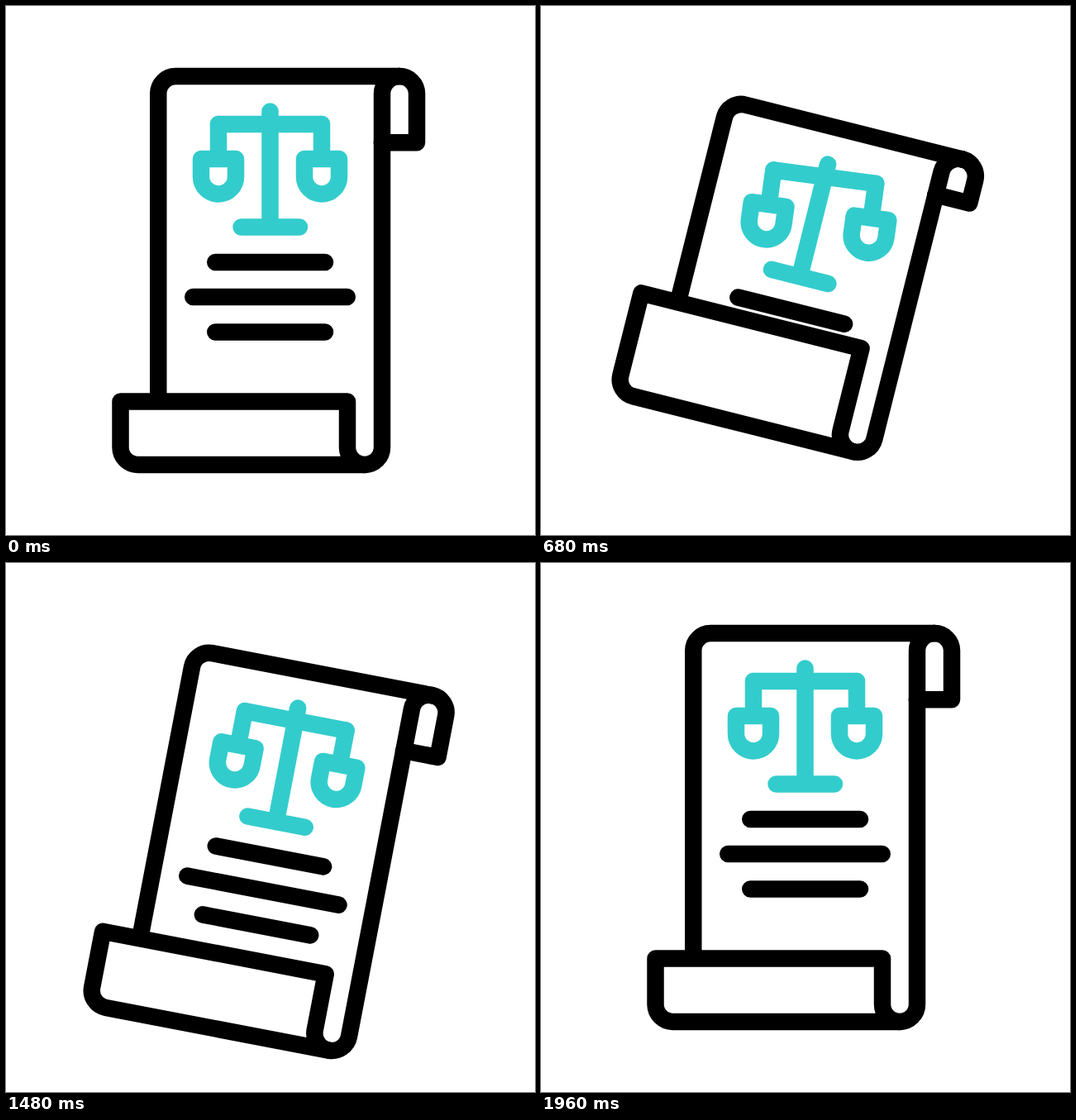
Write an HTML page that moves like this. It is 640x640 px and loops after 2000 ms.

```html
<!DOCTYPE html>
<html lang="en">
<head>
<meta charset="utf-8">
<title>Legal scroll</title>
<style>
  html, body { margin: 0; width: 100%; height: 100%; overflow: hidden; background: #fff; }
  svg { display: block; width: 100%; height: 100%; }
  path { fill: none; stroke: #000; stroke-width: 20.5; stroke-linecap: round; stroke-linejoin: round; }
  .teal path { stroke: #33cccc; }
  #box { fill: #fff; }
</style>
</head>
<body>
<svg viewBox="0 0 640 640">
  <g id="scroll">
    <path id="sheet"/>
    <path id="curl"/>
    <g id="content">
      <path d="M253.25 310H386M226.25 352H412.75M253.25 394.5H386"/>
      <g class="teal">
        <path d="M319.5 127.5V267.5M284.5 267.5H355"/>
        <path id="beam" d="M257 143H382"/>
        <path id="leftPan"/>
        <path id="rightPan"/>
      </g>
    </g>
    <path id="box"/>
    <path id="spine"/>
  </g>
</svg>
<script>
const LOOP = 2000, STEP = 40;
const PIVOT = '470 320';
const HUB = { x: 319.5, y: 143 }, ARM = 62.5;
const LEFT = 184.25, RIGHT = 454.75, TOP = 85, BOTTOM = 555, FOLD = 476, R = 21;
const PAN = 'M0 0V42M-21 42H21V63.5a21 21 0 0 1-42 0Z';
const set = (id, name, value) => document.getElementById(id).setAttribute(name, value);

// Smooth step from 0 to 1 between two times.
function ease(t, from, to) {
  const p = Math.min(1, Math.max(0, (t - from) / (to - from)));
  return p * p * (3 - 2 * p);
}

// Eases up to 1, holds, and eases back to 0.
const pulse = (t, start, full, leave, end) => ease(t, start, full) - ease(t, leave, end);

function drawPaper(rolled, slide) {
  const top = TOP + rolled;
  const curlEnd = 165.25 + 0.675 * rolled;
  const boxTop = 478.5 - 0.48 * slide;
  set('sheet', 'd', `M${LEFT} ${boxTop}V${top + R}a${R} ${R} 0 0 1 ${R} ${-R}H${FOLD}`);
  set('curl', 'd', `M${FOLD} ${top}a${R} ${R} 0 0 1 ${R} ${R}V${curlEnd}H${RIGHT}`);
  set('box', 'd', `M434 ${BOTTOM}H159.5a${R} ${R} 0 0 1 ${-R} ${-R}V${boxTop}H413V${BOTTOM - R}a${R} ${R} 0 0 0 ${R} ${R}`);
  set('spine', 'd', `M${FOLD} ${top}a${R} ${R} 0 0 0 ${-R} ${R}V${BOTTOM - R}a${R} ${R} 0 0 1 ${-R} ${R}`);
}

function drawScales(tilt, sway) {
  const a = tilt * Math.PI / 180;
  set('beam', 'transform', `rotate(${tilt} ${HUB.x} ${HUB.y})`);
  for (const [id, reach] of [['leftPan', -ARM], ['rightPan', ARM]]) {
    const x = HUB.x + reach * Math.cos(a);
    const y = HUB.y + reach * Math.sin(a);
    set(id, 'transform', `translate(${x} ${y}) rotate(${sway})`);
  }
}

function render(t) {
  const angle = 14.1 * pulse(t, 0, 600, 1290, 1900);
  const drop = 58.5 * pulse(t, 0, 300, 300, 600) + 60 * pulse(t, 1245, 1590, 1590, 1915);
  const rolled = 113 * pulse(t, 57, 892, 917, 1723);
  const slide = 111.5 * pulse(t, 27, 862, 975, 1725);
  const swingBack = pulse(t, 0, 560, 640, 1020);
  const swingForth = pulse(t, 640, 1020, 1020, 1490);

  set('scroll', 'transform', `translate(0 ${drop}) rotate(${angle} ${PIVOT})`);
  set('content', 'transform', `translate(0 ${slide})`);
  drawPaper(rolled, slide);
  drawScales(12.6 * swingForth - 7.2 * swingBack, 3.7 * swingForth - 6.6 * swingBack);
}

set('leftPan', 'd', PAN);
set('rightPan', 'd', PAN);

const start = performance.now();
function frame() {
  const t = (performance.now() - start) % LOOP;
  render(Math.floor(t / STEP) * STEP);
  requestAnimationFrame(frame);
}
frame();
</script>
</body>
</html>
```
